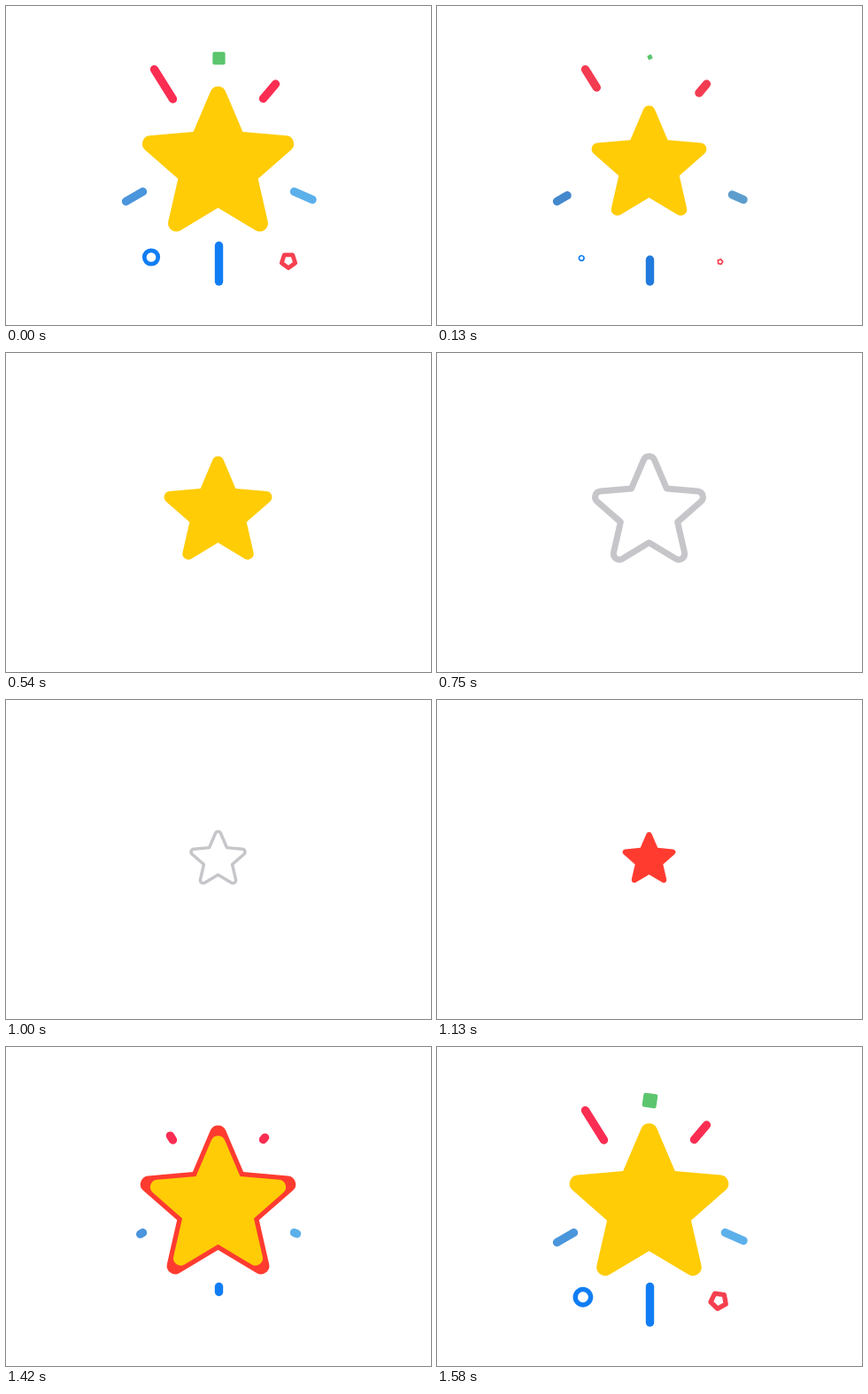
Recreate the animation shown at these times as an HTML page. Size 480x360 px, loop 1.62 s.

```html
<!DOCTYPE html>
<html lang="en">
<head>
<meta charset="utf-8">
<title>Star burst</title>
<style>
  html, body { margin: 0; width: 100%; height: 100%; overflow: hidden; background: #fff; }
  svg { display: block; width: 100vw; height: 100vh; }
</style>
</head>
<body>
<svg id="stage" viewBox="0 0 480 360"></svg>
<script>
const LOOP = 1620, STEP = 1000 / 24, FRAMES = 39;
const CX = 239.5, CY = 180.3;
const stage = document.getElementById('stage');

function set(el, attrs) {
  for (const name in attrs) el.setAttribute(name, attrs[name]);
}

function add(tag, attrs) {
  const el = document.createElementNS('http://www.w3.org/2000/svg', tag);
  set(el, attrs);
  return stage.appendChild(el);
}

function show(el, visible) {
  el.style.display = visible ? '' : 'none';
}

// Progress from 0 to 1 between two frames.
const progress = (f, start, end) => Math.min(1, Math.max(0, (f - start) / (end - start)));
const easeOut = (f, start, end) => Math.sin(progress(f, start, end) * Math.PI / 2);
const easeInOut = (f, start, end) => (1 - Math.cos(progress(f, start, end) * Math.PI)) / 2;

// Five-pointed star with rounded tips and sharp inner corners.
function starPath(tipRadius, innerRadius, round) {
  const innerX = innerRadius * Math.sin(Math.PI / 5);
  const innerY = innerRadius * Math.cos(Math.PI / 5);
  const half = Math.atan2(innerX, tipRadius - innerY);
  const cut = round / Math.tan(half);
  const radial = tipRadius - cut * Math.cos(half);
  const lateral = cut * Math.sin(half);
  const at = (angle, u, v) => {
    const c = Math.cos(angle), s = Math.sin(angle);
    return `${(u * c - v * s).toFixed(2)} ${(u * s + v * c).toFixed(2)}`;
  };
  let path = '';
  for (let i = 0; i < 5; i++) {
    const tip = -Math.PI / 2 + i * Math.PI * 0.4;
    path += `${i ? 'L' : 'M'}${at(tip, radial, -lateral)}` +
      `A${round} ${round} 0 0 1 ${at(tip, radial, lateral)}` +
      `L${at(tip + Math.PI / 5, innerRadius, 0)}`;
  }
  return path + 'Z';
}

function pentagonPoints(radius) {
  return Array.from({ length: 5 }, (_, i) => {
    const a = Math.PI / 2 + i * Math.PI * 0.4;
    return `${(radius * Math.cos(a)).toFixed(2)},${(radius * Math.sin(a)).toFixed(2)}`;
  }).join(' ');
}

function ray(x1, y1, x2, y2, color, faded) {
  const el = add('line', { 'stroke-width': 9.4, 'stroke-linecap': 'round' });
  return (head, tail) => {
    show(el, head > 0 && tail < 1);
    set(el, {
      x1: x1 + (x2 - x1) * tail, y1: y1 + (y2 - y1) * tail,
      x2: x1 + (x2 - x1) * head, y2: y1 + (y2 - y1) * head
    });
    el.style.stroke = `color-mix(in srgb, ${color}, ${faded} ${tail * 100}%)`;
  };
}

function confetto(x, y, tag, attrs) {
  const el = add(tag, attrs);
  return (reach, size, turn) => {
    show(el, size > 0);
    el.setAttribute('transform', `translate(${CX + (x - CX) * reach} ${CY + (y - CY) * reach}) ` +
      `rotate(${turn}) scale(${size})`);
  };
}

function star(attrs) {
  const el = add('path', { d: starPath(73.9, 33.8, 6.6), ...attrs });
  return scale => {
    show(el, scale > 0);
    el.setAttribute('transform', `translate(${CX} ${CY}) scale(${scale})`);
  };
}

const rays = [
  ray(188.5, 105, 167.5, 71.5, '#fb2d52', '#ea5450'),
  ray(290.5, 104.5, 304.5, 88, '#fb2d52', '#ea5450'),
  ray(154.5, 209.5, 135.5, 220.5, '#4a95dc', '#3b74b8'),
  ray(325.5, 209.5, 346, 218.5, '#5cb0ea', '#5b7ea0'),
  ray(240.5, 270.5, 240.5, 311, '#117df4', '#3b74b8')
];

const hollow = { fill: 'none', 'stroke-width': 4.8, 'stroke-linejoin': 'round' };
const confetti = [
  confetto(240.5, 59, 'rect', { x: -7.2, y: -7.2, width: 14.4, height: 14.4, rx: 2, fill: '#5cc56e' }),
  confetto(164, 283.5, 'circle', { ...hollow, r: 7.8, stroke: '#117df4' }),
  confetto(319, 287.5, 'polygon', { ...hollow, points: pentagonPoints(8.2), stroke: '#f5404f' })
];

const outline = star({ fill: '#fff', stroke: '#c6c6ca', 'stroke-width': 7, 'stroke-linejoin': 'round' });
const red = star({ fill: '#ff3b30' });
const yellow = star({ fill: '#ffcc05' });

// Swells past full size, dips below it, then settles at 1.
const yellowSize = f => 1.5 * easeOut(f, 28.3, 37.3)
  - 0.59 * easeInOut(f, 37, 44.6) + 0.09 * easeInOut(f, 44.6, 52);

function render(time) {
  const frame = Math.min(FRAMES - 1, Math.floor((time % LOOP + 5) / STEP));
  // The burst runs across the loop seam, so its tail continues past the last frame.
  const f = frame < 18 ? frame + FRAMES : frame;

  outline(f < FRAMES ? 1 - easeInOut(f, 21, 27) : 0);
  red(f < 37 ? 1.44 * easeOut(f, 25, 34) : 0);
  yellow(yellowSize(f));

  const head = easeInOut(f, 33, 37), tail = easeInOut(f, 39, 46);
  rays.forEach(draw => draw(head, tail));

  const reach = 1.012 - 0.012 * 2 ** (FRAMES - f);
  const size = 1.16 * (easeOut(f, 33, 36) - easeInOut(f, 37, 45));
  confetti.forEach(draw => draw(reach, size, 8 * (FRAMES - f)));
}

const start = performance.now();
function tick() {
  render(performance.now() - start);
  requestAnimationFrame(tick);
}
tick();
</script>
</body>
</html>
```
